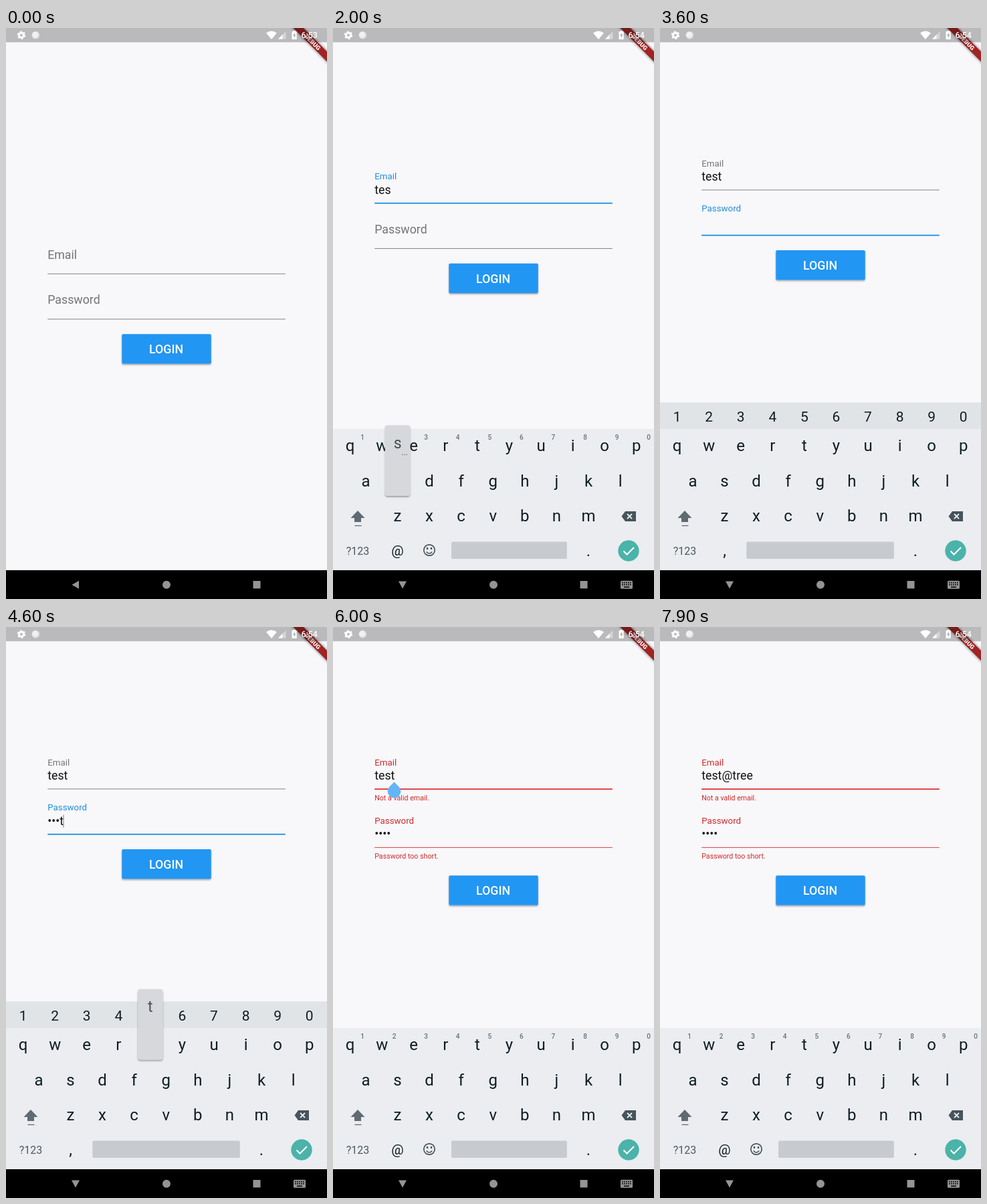
Animation, 480 px wide and 853 px high, one loop 8000 ms. Source, as an HTML page:

```html
<!DOCTYPE html>
<html lang="en">
<head>
<meta charset="utf-8">
<title>Login form</title>
<style>
html, body { margin: 0; width: 100%; height: 100%; overflow: hidden; background: #f8f7fa; }
svg { display: block; width: 480px; height: 853px; font-family: Roboto, "Noto Sans", sans-serif; }
</style>
</head>
<body>
<svg viewBox="0 0 480 853">
  <defs>
    <filter id="soft" x="-20%" y="-50%" width="140%" height="220%"><feGaussianBlur stdDeviation="2"/></filter>
    <filter id="drop" x="-20%" y="-20%" width="140%" height="150%">
      <feDropShadow dx="0" dy="1.6" stdDeviation="1.3" flood-opacity=".38"/>
    </filter>
  </defs>
  <rect width="480" height="853" fill="#f8f7fa"/>
  <g id="form"></g>
  <g transform="translate(480 0) rotate(45)">
    <rect x="-40" y="24.9" width="80" height="10.7" opacity=".55" filter="url(#soft)"/>
    <rect x="-40" y="24.9" width="80" height="10.7" fill="#a02424"/>
    <text y="33.4" font-size="9" font-weight="900" text-anchor="middle" fill="#fff">DEBUG</text>
  </g>
  <rect width="480" height="21.3" opacity=".25"/>
  <g fill="#fff">
    <circle cx="23" cy="10.7" r="3.5" fill="none" stroke="#fff" stroke-width="3"/>
    <circle cx="23" cy="10.7" r="5.3" fill="none" stroke="#fff" stroke-width="2" stroke-dasharray="2.8 2.75"/>
    <circle cx="44.3" cy="10.7" r="5.8" opacity=".55"/>
    <circle cx="43.6" cy="10" r="4.4" opacity=".55"/>
    <path d="M389 7.5Q397 1.5 405 7.5L397 17Z"/>
    <path d="M407 16.5L418.500 5V16.500Z" opacity=".4"/>
    <path d="M407 16.500L413.500 10V16.500Z"/>
    <path d="M427.500 5.300H429.500V4H432.700V5.300H434.700V17H427.500Z"/>
    <path d="M431.700 7L429 11.500H430.800V15L433.300 10.300H431.700Z" fill="#aaa8aa"/>
    <text id="clock" x="441.500" y="15.300" font-size="12.400" font-weight="500"></text>
  </g>
  <g id="keys"></g>
  <rect y="810" width="480" height="43"/>
  <g fill="#949494">
    <path id="back"/>
    <circle cx="240" cy="831.700" r="6"/>
    <rect x="369.500" y="826" width="11" height="11.300"/>
    <g id="switcher">
      <rect x="430" y="825.700" width="18" height="12" rx="1.500"/>
      <path d="M432 828.700H446M432 831.700H446" stroke="#000" stroke-width="1.700" stroke-dasharray="1.700 1.300"/>
      <path d="M435 835.200H443" stroke="#000" stroke-width="1.500"/>
    </g>
  </g>
</svg>
<script>
const EMAIL_KB = 211, PASS_KB = 250.5, LOOP = 8000;
const BLUE = '#1b90dc', RED = '#cf2a2a', GREY = '#757477', INK = '#0f1d24';
const $ = id => document.getElementById(id);

// Each step changes only the listed parts of the state.
const steps = [
  [0, {kb: 0, focus: -1, email: '', pass: '', err: 0, key: '', cursor: 0, handle: 0, press: 0, clock: '6:53'}],
  [900, {kb: EMAIL_KB, focus: 0}],
  [1100, {cursor: 1}],
  [1300, {cursor: 0, clock: '6:54'}],
  [1500, {email: 't', key: 't'}],
  [1600, {email: 'te', key: 'e'}],
  [1800, {key: ''}],
  [2000, {email: 'tes', key: 's'}],
  [2200, {email: 'test', key: 't'}],
  [2400, {key: '', cursor: 1}],
  [2600, {kb: 0, focus: -1, cursor: 0}],
  [3200, {focus: 1}],
  [3400, {kb: PASS_KB}],
  [3800, {pass: 't', key: 't'}],
  [4000, {pass: '•e', key: 'e'}],
  [4200, {pass: '••s', key: 's'}],
  [4400, {key: ''}],
  [4600, {pass: '•••t', key: 't', cursor: 1}],
  [4800, {key: '', cursor: 0}],
  [5000, {pass: '••••', press: 1}],
  [5200, {err: 1, press: 0}],
  [5600, {focus: 0, kb: EMAIL_KB, handle: 1}],
  [6400, {handle: 0}],
  [6600, {email: 'test@', key: '@'}],
  [6800, {email: 'test@t', key: 't'}],
  [7000, {email: 'test@tr', key: 'r'}],
  [7200, {email: 'test@tre', key: 'e'}],
  [7400, {key: ''}],
  [7600, {email: 'test@tree', key: 'e'}],
  [7700, {key: '', cursor: 1}],
  [7900, {cursor: 0}]
];

const rows = [['qwertyuiop', 25.6, 632], ['asdfghjkl', 49, 684.5], ['zxcvbnm', 96.5, 737]];
const keyX = (start, i) => start + 47.57 * i;
const text = (s, x, y, size, fill, more = '') =>
  `<text x="${x}" y="${y}" font-size="${size}" fill="${fill}" ${more}>${s}</text>`;
const mid = (s, x, y, size, fill = INK, more = '') =>
  text(s, x, y, size, fill, `text-anchor="middle" ${more}`);
const box = (x, y, w, h, fill, more = '') =>
  `<rect x="${x}" y="${y}" width="${w}" height="${h}" fill="${fill}" ${more}/>`;

function field(s, i, label, value, error, line) {
  const on = s.focus === i, floated = on || value;
  const color = s.err ? RED : on ? BLUE : GREY;
  const thick = on ? 1.8 : 0.9;
  let out = floated ? text(label, 62.2, line - 35.3, 13.33, color)
                    : text(label, 62.2, line - 22.5, 17.78, GREY);
  out += text(value, 62.2, line - 14, 17.78, '#111', `id="value${i}"`);
  out += box(62.2, line - thick / 2, 355.6, thick, s.err ? '#dc3030' : color);
  if (s.err) out += text(error, 62.2, line + 16.8, 10.67, RED);
  return out;
}

function drawForm(s) {
  const grow = s.err * 19.5, line = 367.2 - s.kb / 2 - grow;
  const button = line + 90 + 2 * grow;
  let out = field(s, 0, 'Email', s.email, 'Not a valid email.', line)
    + field(s, 1, 'Password', s.pass, 'Password too short.', line + 67.7 + grow)
    + box(173.3, button, 133.4, 44.4, s.press ? '#4aa8f5' : '#2196f3', 'rx="1.8" filter="url(#drop)"')
    + mid('LOGIN', 239.5, button + 28.8, 17.78, '#fff', 'font-weight="500"');
  if (s.handle) out += `<path transform="translate(91.5 ${line - 10.6}) rotate(45)"
    d="M0 0H9.800A9.800 9.800 0 1 1 0 9.800Z" fill="#64b5f6"/>`;
  $('form').innerHTML = out;
  if (s.cursor) {
    const x = 62.2 + $('value' + s.focus).getComputedTextLength();
    const y = line - 29 + s.focus * (67.7 + grow);
    $('form').innerHTML += box(x - 0.5, y, 1, 19, '#777');
  }
}

function popup(s) {
  let x = 96.5, y = 789, row = 3;
  rows.forEach(([letters, start, base], r) => {
    const i = letters.indexOf(s.key);
    if (i >= 0) [x, y, row] = [keyX(start, i), base, r];
  });
  const dots = s.kb === EMAIL_KB || row === 1;
  return box(x - 18.7, y - 91, 37.4, 105.5, '#d6d8db', 'rx="4" filter="url(#drop)"')
    + mid(s.key, x, y - 57, 23, '#465158')
    + (dots ? mid('...', x + 10.5, y - 46.5, 12, '#465158') : '');
}

function drawKeys(s) {
  if (!s.kb) return $('keys').innerHTML = '';
  const pass = s.kb === PASS_KB;
  let out = box(0, 810 - s.kb, 480, s.kb, '#ebedf0');
  if (pass) out += box(0, 810 - s.kb, 480, 39.5, '#e1e4e7');
  [...'1234567890'].forEach((n, i) => out += pass
    ? mid(n, keyX(25.6, i), 587.7, 21)
    : mid(n, keyX(44, i), 614.6, 10, '#66737a', 'font-weight="500"'));
  for (const [letters, start, y] of rows)
    [...letters].forEach((c, i) => out += mid(c, keyX(start, i), y, 24));
  out += mid('?123', 37, 786.8, 16, '#4d5a61')
    + mid('.', 382, 789, 24)
    + mid(pass ? ',' : '@', 96.5, pass ? 789 : 788, pass ? 24 : 20.5)
    + (pass ? box(129.3, 767.5, 220.5, 25.5, '#c7cacf', 'rx="2"')
            : box(177, 767.5, 172.8, 25.5, '#c7cacf', 'rx="2"'))
    + `<path d="M37 721L47.500 732H42V738H32V732H26.500Z" fill="#5f6b72"/>
      <path d="M32.500 743.500H42.500" stroke="#5f6b72" stroke-width="1.300"/>
      <path d="M431.500 729.500L437 722H453V737H437Z" fill="#46545c"/>
      <path d="M440 726L447 733M447 726L440 733" stroke="#ebedf0" stroke-width="1.800"/>
      <circle cx="442" cy="781" r="15.700" fill="#4bb3a9"/>
      <path d="M434.500 781.500L439.500 786.500L450 776" fill="none" stroke="#fff" stroke-width="2"/>`;
  if (!pass) out += `<g fill="none" stroke="#46545c" stroke-width="1.700">
    <circle cx="144" cy="780" r="8.200"/><path d="M139.800 782.500Q144 787.500 148.200 782.500"/></g>
    <path d="M141 776v3M147 776v3" stroke="#46545c" stroke-width="2.300"/>`;
  if (s.key) out += popup(s);
  $('keys').innerHTML = out;
}

function draw(s) {
  drawForm(s);
  drawKeys(s);
  $('clock').textContent = s.clock;
  $('back').setAttribute('d', s.kb ? 'M98 826.500H110L104 837.500Z' : 'M98.500 831.700L109 825.700V837.700Z');
  $('switcher').style.display = s.kb ? '' : 'none';
}

let shown = -1;
const begin = performance.now();
function tick() {
  const t = (performance.now() - begin) % LOOP;
  const passed = steps.filter(([at]) => at <= t);
  if (passed.length !== shown) {
    shown = passed.length;
    draw(Object.assign({}, ...passed.map(([, change]) => change)));
  }
  requestAnimationFrame(tick);
}
tick();
</script>
</body>
</html>
```
